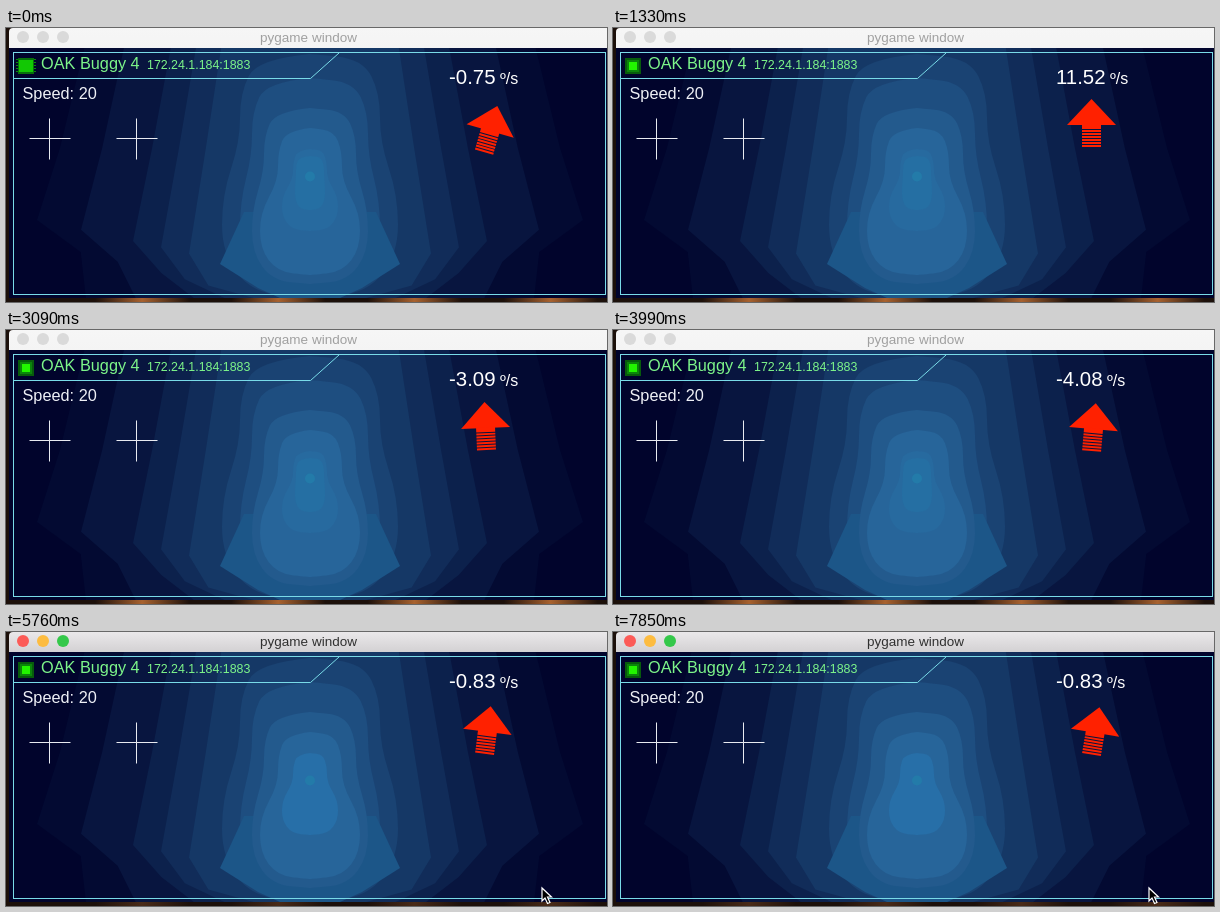
Write an HTML page with a canvas that moves like this. It is 601 by 274 pixels and loops after 8000 ms.

```html
<!DOCTYPE html>
<html lang="en">
<head>
<meta charset="utf-8">
<title>Rover control</title>
<style>
  html, body { margin: 0; width: 100%; height: 100%; overflow: hidden; background: #160d08; }
  canvas { display: block; }
</style>
</head>
<body>
<canvas id="stage" width="601" height="274"></canvas>
<script>
const ctx = document.getElementById('stage').getContext('2d');
const LOOP = 8000, STEP = 148, LAST_STEP = 53, AXIS = 304;
const SANS = '"Liberation Sans", Arial, sans-serif';
const CYAN = '#79dbe8', RED = '#ff2100';

// Turning points of the rover: the window redraws once per step.
const TURNS = [
  { step: 0, rate: -.75, heading: 16 },
  { step: 4, rate: -6, heading: 19 },
  { step: 8, rate: 9, heading: 12 },
  { step: 9, rate: 11.52, heading: 0 },
  { step: 16, rate: 10.83, heading: -6.3 },
  { step: 23, rate: -12, heading: 0 },
  { step: 27, rate: -4.08, heading: 5 },
  { step: 33, rate: -.84, heading: 6.5 },
  { step: 45, rate: -.81, heading: 8.2 },
  { step: LAST_STEP, rate: -.83, heading: 9.5 },
];

// Eases between turning points, with a slight sensor wobble that fades at each of them.
function sense(name, step) {
  const i = Math.max(1, TURNS.findIndex(turn => turn.step >= step));
  const from = TURNS[i - 1], to = TURNS[i];
  const u = (step - from.step) / (to.step - from.step);
  const eased = (1 - Math.cos(Math.PI * u)) / 2;
  return from[name] + (to[name] - from[name]) * eased + .04 * Math.sin(4 * Math.PI * u);
}

function rect(color, x, y, w, h) {
  ctx.fillStyle = color;
  ctx.fillRect(x, y, w, h);
}

function text(string, x, y, size, color) {
  ctx.font = `${size}px ${SANS}`;
  ctx.fillStyle = color;
  ctx.fillText(string, x, y);
}

function line(color, ...points) {
  ctx.strokeStyle = color;
  ctx.lineWidth = 1;
  ctx.beginPath();
  points.forEach(([x, y]) => ctx.lineTo(x, y));
  ctx.stroke();
}

function disc(color, x, y, r) {
  ctx.fillStyle = color;
  ctx.beginPath();
  ctx.arc(x, y, r, 0, 7);
  ctx.fill();
}

// Fills an outline given by its half as [distance from axis, y].
function mirrored(color, half, smooth) {
  const right = half.map(([d, y]) => [AXIS + d, y]).reverse();
  const points = half.map(([d, y]) => [AXIS - d, y]).concat(right);
  ctx.fillStyle = color;
  ctx.beginPath();
  points.forEach(([x, y], i) => {
    const [nextX, nextY] = points[i + 1] || points[0];
    if (smooth && i) ctx.quadraticCurveTo(x, y, (x + nextX) / 2, (y + nextY) / 2);
    else ctx.lineTo(x, y);
  });
  ctx.fill();
}

const glow = level => `rgb(${3 + 4.5 * level}, ${10 + 11.4 * level}, ${50 + 13 * level})`;

function facet(level, width) {
  const hip = 192 + (273 - width) * .22;
  mirrored(glow(level), [[width * .9 - 20, 20], [width * .96 - 12, 120], [width, hip],
    [width * .84, hip + 32], [width * 1.15 - 90, 272]], false);
}

function bell(color, top, head, hip, bottom) {
  const y = part => top + (bottom - top) * part;
  mirrored(color, [[0, top], [head * .75, y(.02)], [head, y(.16)], [head, y(.36)],
    [hip, y(.58)], [hip, y(.82)], [hip * .65, y(.98)], [0, bottom]], true);
}

function drawDesktop(focused) {
  const dark = '#1c100a';
  const strip = ctx.createLinearGradient(0, 0, 601, 0);
  for (let x = 145; x < 601; x += 145) {
    strip.addColorStop((x - 50) / 640, dark);
    strip.addColorStop(x / 640, focused ? '#4a2b18' : '#a8622f');
    strip.addColorStop((x + 50) / 640, dark);
  }
  rect(dark, 0, 0, 601, 274);
  rect(strip, 0, 270, 601, 4);
}

function drawBackdrop(focused) {
  ctx.save();
  ctx.beginPath();
  ctx.rect(3, 20, 598, 250);
  ctx.clip();
  rect('#01042c', 3, 20, 598, 250);
  [273, 229, 177, 149, 121].forEach((width, level) => facet(level, width));
  bell(glow(5), 26, 70, 88, 270);
  bell(glow(6), 50, 58, 70, 264);
  mirrored('#1c5688', [[66, 184], [90, 236], [52, 260], [30, 270]], false);
  bell(glow(7), 80, 46, 58, 256);
  bell(glow(8), 100, 32, 50, 247);
  bell(focused ? '#276fa8' : '#276a9f', 121, 17, 28, 203);
  if (!focused) bell('#256fa3', 128, 14, 15, 182);
  disc('#237ba9', AXIS, 148.5, 5);
  ctx.restore();
}

function drawTitleBar(focused) {
  const shade = ctx.createLinearGradient(0, 0, 0, 20);
  shade.addColorStop(0, focused ? '#eae8ea' : '#f6f6f6');
  shade.addColorStop(1, focused ? '#d3d1d3' : '#f4f4f4');
  ctx.fillStyle = shade;
  ctx.beginPath();
  ctx.roundRect(3, 0, 598, 20, [4, 0, 0, 0]);
  ctx.fill();
  ['#fc5b57', '#fdbc40', '#34c84a'].forEach((color, i) =>
    disc(focused ? color : '#dadada', 17 + 20 * i, 9, 6));
  ctx.textAlign = 'center';
  text('pygame window', 302.5, 14, 13.5, focused ? '#303030' : '#a0a0a0');
  ctx.textAlign = 'left';
}

function drawChip(wide) {
  if (wide) {
    for (let y = 31; y < 46; y += 3) rect('#0b8a0b', 10, y, 20, 1);
    rect('#07700a', 12, 30, 16, 16);
    rect('#12c804', 13, 32, 14, 12);
  } else {
    rect('#075c0c', 12, 30, 16, 16);
    rect('#0b850b', 14, 32, 12, 12);
    rect('#22f500', 16, 34, 8, 8);
  }
}

function drawStick(x, y, push) {
  const handle = x + 20 * push;
  line('#e8eaf0', [x - 20, y], [x + 21, y]);
  line('#e8eaf0', [handle, y - 20], [handle, y + 21]);
}

// The rotated square keeps the top left corner of its bounding box in place.
function drawArrow(degrees) {
  const angle = degrees * Math.PI / 180;
  const half = 25 * (Math.cos(angle) + Math.abs(Math.sin(angle)));
  ctx.save();
  ctx.translate(453.5 + half, 71 + half);
  ctx.rotate(angle);
  ctx.fillStyle = RED;
  ctx.beginPath();
  ctx.moveTo(0, -25);
  ctx.lineTo(24.5, 1);
  ctx.lineTo(-24.5, 1);
  ctx.fill();
  rect(RED, -9.5, 0, 19, 5);
  for (let y = 6; y < 24; y += 3) rect(RED, -9.5, y, 19, 2);
  ctx.restore();
}

function drawCursor(x, y) {
  ctx.beginPath();
  [[0, 0], [0, 13], [3, 10], [5.5, 15.5], [8, 14.5], [5.5, 9], [9.5, 9]]
    .forEach(([dx, dy]) => ctx.lineTo(x + dx, y + dy));
  ctx.closePath();
  ctx.fillStyle = '#000';
  ctx.strokeStyle = '#fff';
  ctx.lineWidth = 1.2;
  ctx.fill();
  ctx.stroke();
}

function drawPanel(step) {
  ctx.strokeStyle = CYAN;
  ctx.lineWidth = 1;
  ctx.strokeRect(7.5, 24.5, 592, 242);
  line(CYAN, [8, 50.5], [304.5, 50.5], [333, 25]);

  drawChip(step % 7 < 2);
  text('OAK Buggy 4', 35, 41, 16.3, '#7df58a');
  text('172.24.1.184:1883', 141, 41, 12.4, '#7df58a');
  text('Speed: 20', 16.5, 71, 16.3, '#eef0f6');

  drawStick(43.5, 110.5, step >= 43 && step < 47 ? -1 : 0);
  drawStick(130.5, 110.5, 0);

  const rate = sense('rate', step).toFixed(2);
  text(rate, 443, 55.5, 20.4, '#fff');
  text('º/s', 447.5 + ctx.measureText(rate).width, 55.5, 16, '#fff');
  drawArrow(sense('heading', step));
}

function draw(time) {
  const step = Math.min(LAST_STEP, Math.floor(time / STEP + .1));
  const focused = step >= 33;
  drawDesktop(focused);
  drawBackdrop(focused);
  drawTitleBar(focused);
  drawPanel(step);
  if (step >= 37) drawCursor(536, 256);
}

const start = performance.now();
function tick() {
  draw((performance.now() - start) % LOOP);
  requestAnimationFrame(tick);
}
tick();
</script>
</body>
</html>
```
